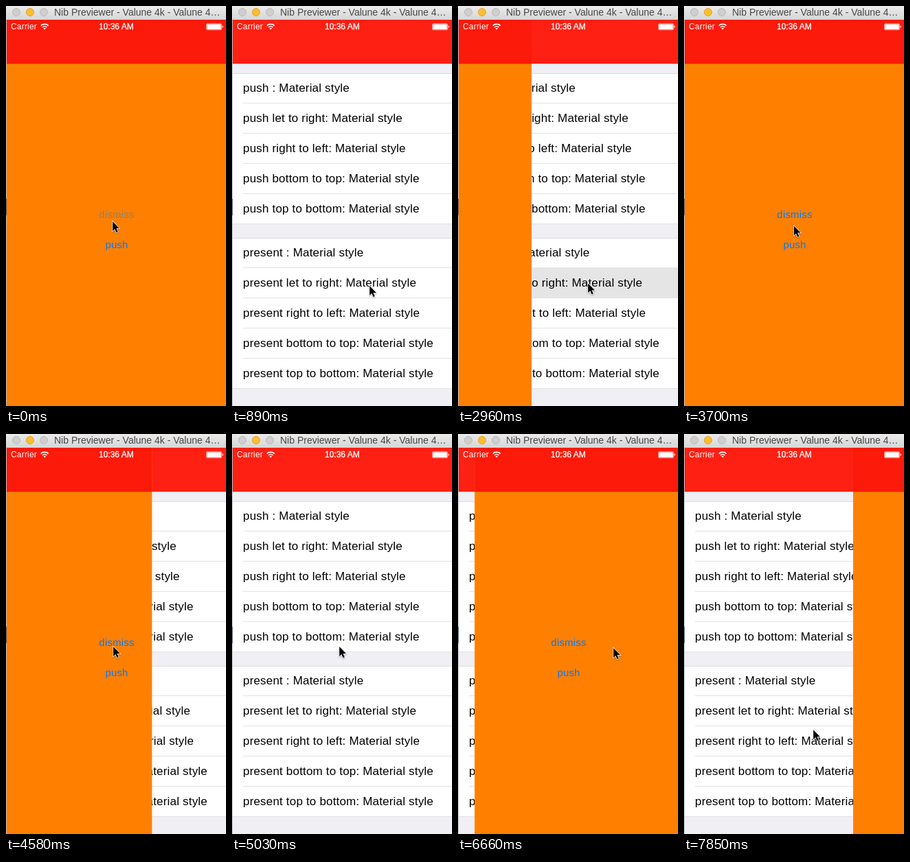
An HTML page that plays this animation: 320x583 px, repeating every 8000 ms.

```html
<!DOCTYPE html>
<html lang="en">
<head>
<meta charset="utf-8">
<title>Material transitions</title>
<style>
html, body { margin: 0; width: 100%; height: 100%; overflow: hidden; }
body { font-family: "Liberation Sans", Arial, sans-serif; letter-spacing: .18px; }
#stage { position: relative; width: 320px; height: 583px; overflow: hidden; background: #b9bcc0; white-space: nowrap; }
#stage div, #stage svg { position: absolute; }
.titlebar { left: 0; top: 0; width: 320px; height: 20px; background: linear-gradient(#ebebeb, #d6d6d6); }
.titlebar span { position: absolute; left: 70px; font-size: 14px; line-height: 19px; letter-spacing: 0; color: #474747; }
.edge { left: 0; top: 281px; width: 1px; height: 24px; background: #4c5c72; }
.pane { left: 1px; top: 20px; width: 319px; height: 563px; }
.nav { left: 0; top: 0; width: 100%; height: 64px; }
#list { background: #efeff4; }
#list .nav { background: #ff2014; }
#cover { background: #ff8000; }
#cover .nav { background: #fc1a0a; }
.nav::after { content: ""; position: absolute; left: 0; right: 0; bottom: -1px; height: 1px; background: rgba(0, 0, 0, .15); }
.group { left: 0; width: 100%; height: 220px; background: #fff; }
.row { left: 0; width: 100%; height: 44px; line-height: 44px; text-indent: 15px; font-size: 17px; color: #000; }
.row::after { content: ""; position: absolute; left: 15px; right: 0; bottom: 0; height: 1px; background: #e2e2e5; }
.row:last-child::after { left: 0; }
.row:first-child { box-shadow: inset 0 1px #dddde1; }
.row.on { background: #e5e5e5; box-shadow: 0 -1px #e5e5e5; }
.link { left: 0; width: 320px; line-height: 20px; font-size: 15px; text-align: center; color: #007aff; }
#dismiss.down { color: #917f6b; }
.status { top: 20px; line-height: 21px; font-size: 12px; color: #fff; }
</style>
</head>
<body>
<div id="stage">
  <div class="edge"></div>
  <div class="pane" id="list"><div class="nav"></div></div>
  <div class="pane" id="cover">
    <div class="nav"></div>
    <div class="link" id="dismiss" style="top:274px">dismiss</div>
    <div class="link" style="top:318px">push</div>
  </div>

  <div class="status" style="left:7px">Carrier</div>
  <div class="status" style="left:135px;letter-spacing:0;-webkit-text-stroke:.3px #fff">10:36 AM</div>
  <svg width="320" height="40" style="left:0;top:0" fill="none" stroke="#fff">
    <path d="M50.7 28.6a8 8 0 0 1 11 0M52.9 31a4.8 4.8 0 0 1 6.6 0" stroke-width="1.6"/>
    <path d="M54.4 32.6a2.6 2.6 0 0 1 3.6 0l-1.8 1.9z" fill="#fff" stroke="none"/>
    <rect x="291.5" y="25.8" width="22" height="9" rx="1.5" stroke-width=".6"/>
    <path d="M292.3 26.6h20.4v7.4h-20.4zM314.6 28.6c1.7.3 1.7 3.1 0 3.4z" fill="#fff" stroke="none"/>
  </svg>

  <div class="titlebar">
    <svg width="66" height="20" style="left:0;top:0">
      <g fill="#cfcfcf" stroke="#b9b9b9">
        <circle cx="15" cy="9" r="5.5"/>
        <circle cx="35" cy="9" r="5.5" fill="#fdbd2f" stroke="#e2a32a"/>
        <circle cx="55" cy="9" r="5.5"/>
      </g>
    </svg>
    <span>Nib Previewer - Valune 4k - Valune 4…</span>
  </div>

  <svg id="cursor" width="18" height="25" viewBox="-3 -3 20 28" style="left:-2px;top:-1px;filter:drop-shadow(0 1px 1px rgba(0,0,0,.3))">
    <path d="M.5 .5V16L4 12.7 6.5 18.5 9 17.4 6.5 11.7H11.4Z" fill="#000" stroke="#fff" stroke-width="1.6" paint-order="stroke"/>
  </svg>
</div>
<script>
const $ = id => document.getElementById(id);
const LOOP = 8000, STEP = 147.9, LAST = 53, WIPE = 500, GLOW = 440;

const ways = ["", "let to right", "right to left", "bottom to top", "top to bottom"];
function addGroup(verb, top) {
  const group = document.createElement("div");
  group.className = "group";
  group.style.top = top + "px";
  const rows = ways.map((way, i) => {
    const row = document.createElement("div");
    row.className = "row";
    row.style.top = i * 44 + "px";
    row.textContent = `${verb} ${way}: Material style`;
    group.append(row);
    return row;
  });
  $("list").append(group);
  return rows;
}
addGroup("push", 78);
const present = addGroup("present", 318);

// row is the tapped list row; without one the cover closes
const wipes = [
  { press: 0, start: 100, shape: "circle" },
  { press: 2760, start: 2765, shape: "left", row: 1 },
  { press: 4280, start: 4390, shape: "left" },
  { press: 6060, start: 6238, shape: "right", row: 2 },
  { press: 7390, start: 7495, shape: "right" }
];
const masks = {
  circle: a => `circle(${345 * a}px at 159px 284px)`,
  left: a => `inset(0 ${100 - 100 * a}% 0 0)`,
  right: a => `inset(0 0 0 ${100 - 100 * a}%)`
};

// pointer moves: leaving step, arriving step, x, y
const home = [154, 312];
const moves = [
  [5, 7, 214, 437],
  [11, 13, 241, 502],
  [13, 17, 188, 402],
  [21, 27, 155, 308],
  [35, 37, 180, 453],
  [42, 45, 225, 310],
  [45, 48, 156, 310],
  [50, 53, 187, 429]
];

const clamp = v => Math.min(1, Math.max(0, v));
const easeInOut = p => p * p * (3 - 2 * p);
const easeOut = p => p * (2 - p);

function pointer(k) {
  return moves.reduce(([x, y], [leave, arrive, toX, toY]) => {
    const e = easeOut(clamp((k - leave) / (arrive - leave)));
    return [x + (toX - x) * e, y + (toY - y) * e];
  }, home);
}

function draw(now) {
  // the screen refreshes in even steps
  const k = Math.min(LAST, Math.floor((now % LOOP + 10) / STEP));
  const t = k * STEP;
  const { press, start, shape, row } = wipes.filter(w => w.press <= t).pop();
  const e = easeInOut(clamp((t - start) / WIPE));
  $("cover").style.clipPath = masks[shape](row ? e : 1 - e);
  $("dismiss").classList.toggle("down", !row && t < start);
  present.forEach((el, i) => el.classList.toggle("on", i === row && t < press + GLOW));
  const [x, y] = pointer(k);
  $("cursor").style.transform = `translate(${x}px, ${y}px)`;
}

const begin = performance.now();
function tick() {
  draw(performance.now() - begin);
  requestAnimationFrame(tick);
}
tick();
</script>
</body>
</html>
```
